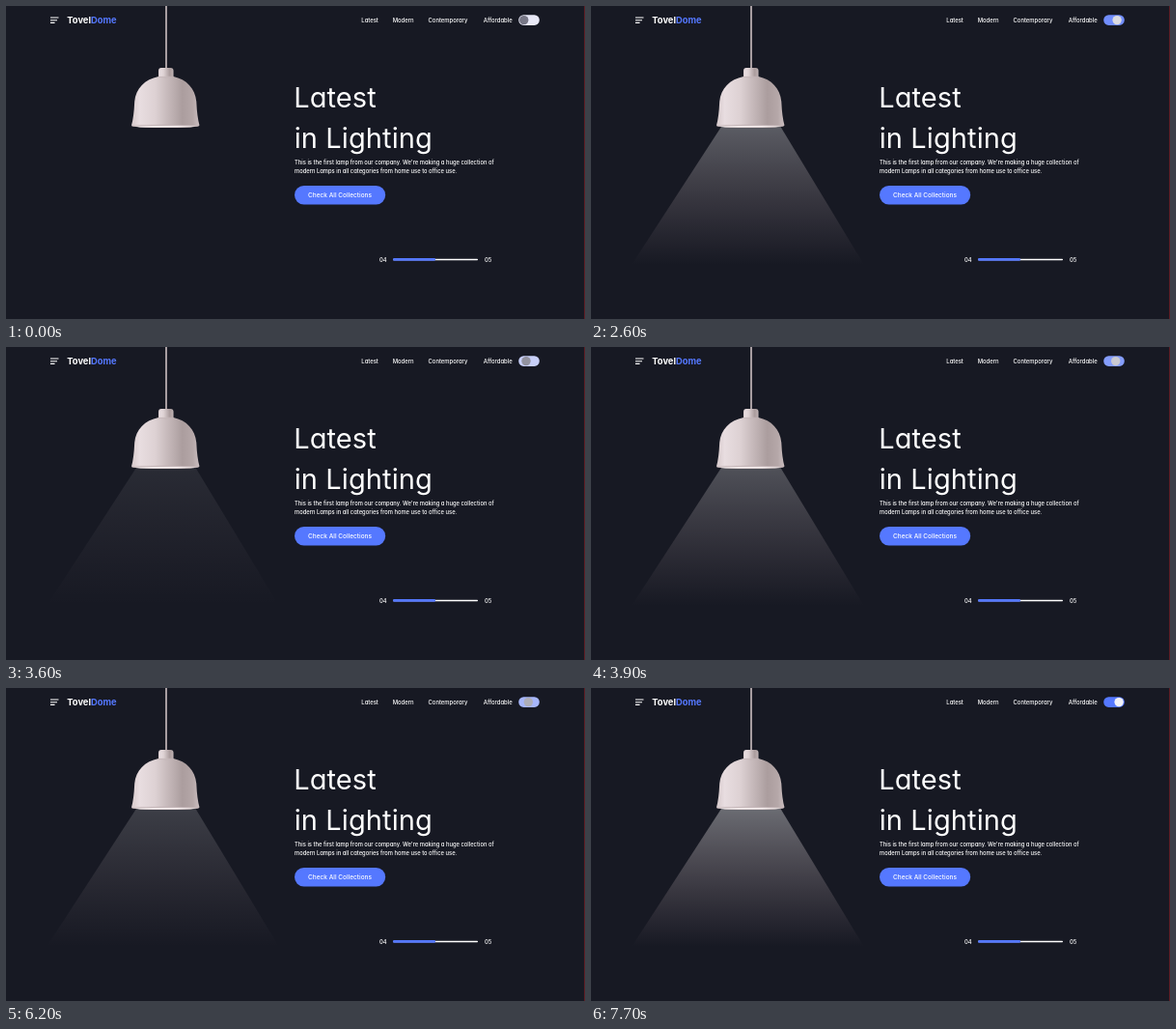
These frames come from a looping animation (600 by 324 pixels, 8000 ms). An HTML page:

```html
<!DOCTYPE html>
<html lang="en">
<head>
<meta charset="utf-8">
<style>
  html, body { margin: 0; width: 100%; height: 100%; overflow: hidden; background: #171923; }
  svg { display: block; width: 100vw; height: 100vh; }
  text { font-family: Inter, "Open Sans", sans-serif; font-feature-settings: "cv11"; fill: #fff; white-space: pre; }
  .logo { font-size: 9.4px; font-weight: 700; }
  .nav { font-size: 5.9px; font-weight: 500; }
  .title { font-size: 29px; letter-spacing: .1px; }
  .body { font-size: 5.8px; font-weight: 500; }
  .cta { font-size: 6.5px; font-weight: 500; }
  .blue { fill: #5578ff; }
</style>
</head>
<body>
<svg viewBox="0 0 600 324">
  <defs>
    <linearGradient id="glow" x2="0" y2="1">
      <stop offset="0" stop-color="#fff" stop-opacity=".36"/>
      <stop offset="1" stop-color="#ffd6dc" stop-opacity="0"/>
    </linearGradient>
    <linearGradient id="shade">
      <stop offset="0" stop-color="#d6c9cb"/>
      <stop offset=".12" stop-color="#e8dde0"/>
      <stop offset=".35" stop-color="#ddd1d3"/>
      <stop offset=".75" stop-color="#ab9d9e"/>
      <stop offset=".9" stop-color="#b5a7a8"/>
      <stop offset="1" stop-color="#cbbec0"/>
    </linearGradient>
  </defs>

  <rect width="600" height="324" fill="#171923"/>
  <path d="M599.5 0V324" stroke="#5c1c24"/>

  <path id="beam" d="M135 125H196.500L283 268H42Z" fill="url(#glow)"/>

  <g id="lamp">
    <path d="M166 0V66" stroke="#b9adb0" stroke-width="1.800"/>
    <path d="M158 74V67Q158 64 161 64H170.500Q173.500 64 173.500 67V74Z" fill="url(#shade)"/>
    <path d="M158 73C161 72.500 170 72.500 173.500 73C187 76 196 85 197.300 99Q198 115 200.500 123.500Q200 126 165 126Q130 126 130 123.500Q132.500 115 133.200 99C134.500 85 144 76 158 73Z" fill="url(#shade)"/>
    <path d="M158 73.300Q166 74.800 173.500 73.300" fill="none" stroke="#bfb1b4" stroke-width=".6"/>
    <ellipse cx="165" cy="124.300" rx="35" ry="1.500" fill="#c3b4b6"/>
    <ellipse cx="165" cy="124.700" rx="31" ry=".8" fill="#f5eeee"/>
  </g>

  <path d="M46 12H54.500M46 14.700H53M46 17.400H50.500" stroke="#fff" stroke-width="1.100"/>
  <text class="logo" x="63.300" y="18">Tovel<tspan class="blue">Dome</tspan></text>

  <g class="nav">
    <text x="368.300" y="16.800">Latest</text>
    <text x="400.700" y="16.800">Modern</text>
    <text x="437.500" y="16.800">Contemporary</text>
    <text x="494.800" y="16.800">Affordable</text>
  </g>
  <rect id="track" x="531.200" y="9.300" width="21.600" height="10.600" rx="5.300"/>
  <circle id="knob" cy="14.600" r="4.700"/>

  <text class="title" x="298.200" y="104.700">Latest</text>
  <text class="title" x="298.700" y="146.700">in Lighting</text>
  <text class="body" x="299" y="164.200">This is the first lamp from our company. We're making a huge collection of</text>
  <text class="body" x="299" y="172.800">modern Lamps in all categories from home use to office use.</text>

  <rect class="blue" x="299" y="186" width="94.200" height="19.500" rx="9.750"/>
  <text class="cta" x="346" y="198.100" text-anchor="middle">Check All Collections</text>

  <text class="body" x="387" y="264.700">04</text>
  <text class="body" x="496" y="264.700">05</text>
  <rect x="401" y="261.700" width="88" height="1.500" rx=".7" fill="#fff"/>
  <rect class="blue" x="401" y="261.100" width="44" height="2.600" rx="1.300"/>
</svg>
<script>
  const LOOP = 8000, STEP = 100;
  // Each switch: start, duration, resulting state
  const switches = [
    [410, 590, 1], [2510, 590, 0], [3380, 1320, 1], [6010, 590, 0], [7105, 595, 1]
  ];
  const beam = document.getElementById("beam");
  const track = document.getElementById("track");
  const knob = document.getElementById("knob");

  const bezier = (a, b, u) => 3 * a * u * (1 - u) ** 2 + 3 * b * u * u * (1 - u) + u ** 3;

  // The standard "ease" curve, solved by bisection
  function ease(x) {
    let lo = 0, hi = 1;
    for (let i = 0; i < 20; i++) {
      const mid = (lo + hi) / 2;
      if (bezier(.25, .25, mid) < x) lo = mid; else hi = mid;
    }
    return x >= 1 ? 1 : bezier(.1, 1, lo);
  }

  function level(t) {
    let value = 0;
    for (const [start, duration, state] of switches) {
      if (t >= start) value += (state - value) * ease(Math.min(1, (t - start) / duration));
    }
    return value;
  }

  const mix = (a, b, k) => `rgb(${a.map((v, i) => Math.round(v + (b[i] - v) * k))})`;

  function draw(now) {
    const t = Math.floor(now % LOOP / STEP) * STEP;
    const k = level(t);
    beam.setAttribute("opacity", k);
    track.setAttribute("fill", mix([232, 232, 246], [85, 120, 255], k));
    knob.setAttribute("fill", mix([119, 119, 134], [242, 242, 247], k));
    knob.setAttribute("cx", 536.7 + 10.4 * k);
    requestAnimationFrame(draw);
  }
  requestAnimationFrame(draw);
</script>
</body>
</html>
```
